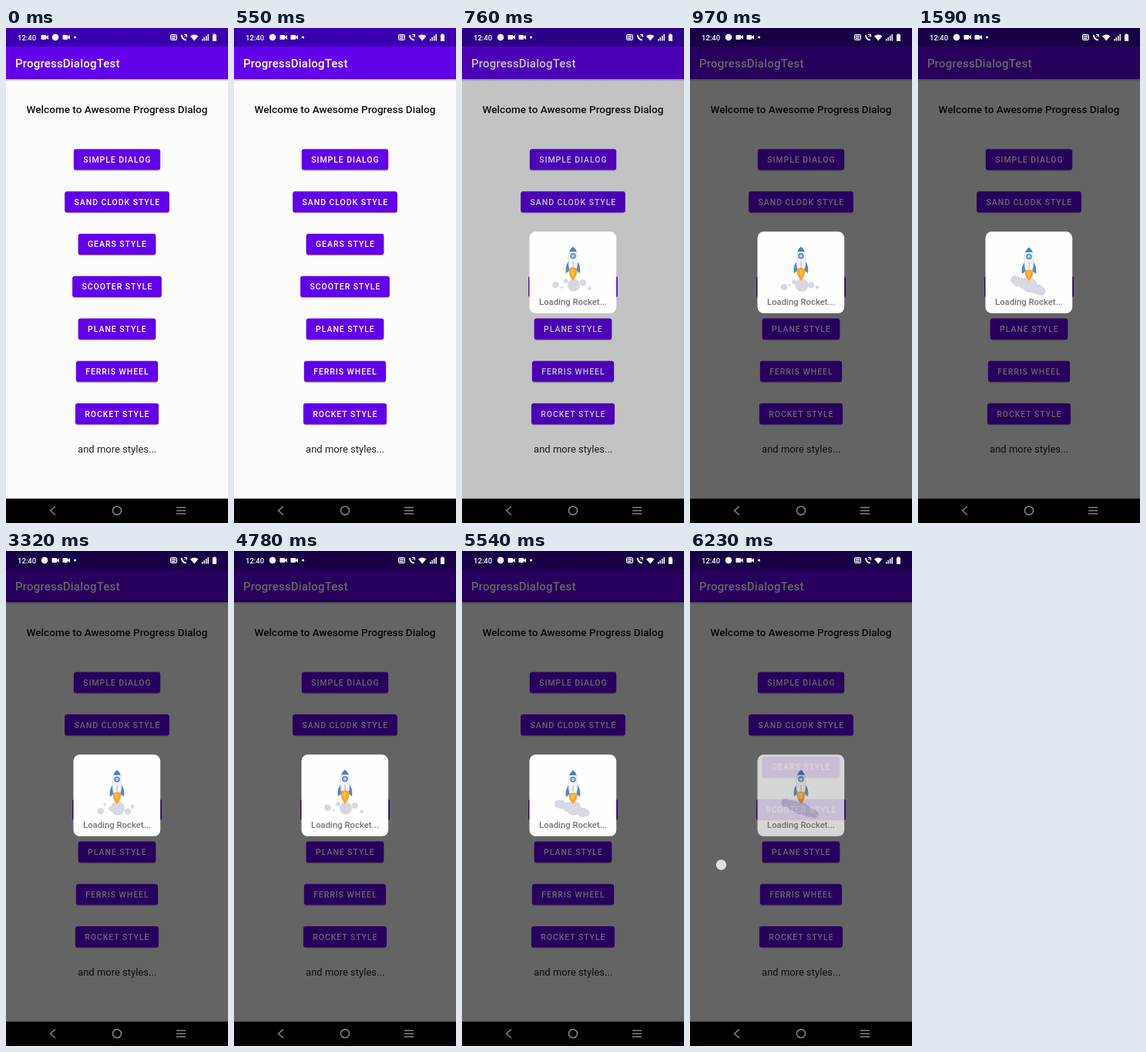
An HTML page for the animation above (6300 ms loop, 288 px wide and 640 px high).

```html
<!DOCTYPE html>
<html lang="en">
<head>
<meta charset="utf-8">
<title>Progress dialog</title>
<style>
  html, body { margin: 0; width: 100%; height: 100%; overflow: hidden; background: #000; }
  svg { display: block; width: 288px; height: 640px; font-family: Roboto, sans-serif; }
  text { dominant-baseline: central; }
  .mid { text-anchor: middle; }
  .medium { font-weight: 500; }
  .button { font-size: 10.5px; font-weight: 500; letter-spacing: .0893em; fill: #fff; }
</style>
</head>
<body>
<svg viewBox="0 0 288 640">
  <defs>
    <linearGradient id="shade" x2="0" y2="1">
      <stop stop-color="#000" stop-opacity=".3"/>
      <stop offset="1" stop-color="#000" stop-opacity="0"/>
    </linearGradient>
    <g id="cam">
      <rect x="-4.5" y="-3" width="6.5" height="6" rx="1"/>
      <path d="M2 -.8 5 -3V3L2 .8Z"/>
    </g>
  </defs>

  <rect width="288" height="640" fill="#fcfcfd"/>
  <rect y="66" width="288" height="3" fill="url(#shade)"/>
  <rect width="288" height="66" fill="#6200ea"/>
  <rect width="288" height="24" fill="#3a00b0"/>
  <text class="medium" x="12" y="45.5" font-size="15" letter-spacing=".19" fill="#fff">ProgressDialogTest</text>
  <text class="mid medium" x="144" y="105" font-size="13.55" fill="#111">Welcome to Awesome Progress Dialog</text>
  <g id="buttons"></g>
  <text class="mid" x="144.2" y="544.5" font-size="13" fill="#222">and more styles...</text>

  <rect id="dim" width="288" height="609"/>

  <g fill="#fff">
    <text class="medium" x="15" y="12.5" font-size="9.5">12:40</text>
    <circle id="badge" cy="12" r="4.3"/>
    <use id="cam1" href="#cam" y="12"/>
    <use href="#cam" x="78" y="12"/>
    <circle cx="89.5" cy="12" r="1.6"/>
    <g fill="none" stroke="#fff">
      <rect x="213.5" y="8.5" width="8" height="7" rx="1" fill="#fff" fill-opacity=".35"/>
      <path d="M215 11h5M215 13.5h4"/>
      <path d="M227.8 8.8c.3 3.5 2.7 6.2 6 6.7" stroke-width="2"/>
      <path d="M231 8.5h3.5V12M234.5 8.5l-3 3"/>
    </g>
    <path d="M239 10.5q5.200-4 10.400 0L244.200 16.500z"/>
    <path d="M254 14h1.500v2.500H254zM256.500 12H258v4.500h-1.500zM259 10h1.500v6.500H259zM261.500 8H263v8.500h-1.500z"/>
    <path d="M268 8.500h1.300v-1h2.400v1H273V17h-5z"/>
  </g>

  <rect y="608.5" width="288" height="32"/>
  <g fill="none" stroke="#858590" stroke-width="1.5">
    <path d="M64 618.5 57.5 624l6.500 5.500"/>
    <circle cx="144" cy="624" r="5.5"/>
    <path d="M221 620h12M221 624h12M221 628h12"/>
  </g>

  <g id="dialog">
    <rect x="87.500" y="263.300" width="112.700" height="105.500" rx="8" fill="#fefeff"/>
    <g id="smoke" fill="#d9d7e3"></g>
    <g id="rocket">
      <path d="M139 302c-4 4-5 9-4 16l5-4zM149 302c4 4 5 9 4 16l-5-4z" fill="#4f8ac4"/>
      <path d="M139.500 289.500c-2 8-2 17 .5 25h8c2.500-8 2.500-17 .5-25z" fill="#f3f3f7" stroke="#d6d6e0" stroke-width=".7"/>
      <path d="M144 283.500c-2.500 2-4 4-4.700 6.500h9.400c-.7-2.500-2.200-4.500-4.700-6.500z" fill="#4682bd"/>
      <circle cx="144" cy="295.500" r="3" fill="#c4cbd6" stroke="#4f8ac4" stroke-width="1.600"/>
      <path d="M143.300 303h1.400v8h-1.400z" fill="#bcc5d2"/>
    </g>
    <g id="flame">
      <path d="M139 313q5-3 10 0c1.500 5-1.500 10-5 14-3.500-4-6.500-9-5-14z" fill="#fba428"/>
      <path d="M142 314h4q1 4-2 8-3-4-2-8z" fill="#ffc044"/>
    </g>
    <text class="mid medium" x="144" y="354" font-size="11.300" fill="#75757c">Loading Rocket...</text>
  </g>
  <circle id="touch" cx="40.500" cy="405.800" r="6.700" fill="#fff" opacity=".8"/>
</svg>
<script>
  const LOOP = 6300, STEPS = 91, SMOKE_LOOP = 2010, TAU = 2 * Math.PI;
  const $ = id => document.getElementById(id);
  const ramp = (t, a, b) => Math.min(1, Math.max(0, (t - a) / (b - a)));
  const ease = k => k * k * (3 - 2 * k);
  const mix = (a, b, k) => a + (b - a) * k;

  function set(el, attrs) {
    for (const k in attrs) el.setAttribute(k, attrs[k]);
    return el;
  }
  function add(parent, tag, attrs = {}) {
    const el = document.createElementNS('http://www.w3.org/2000/svg', tag);
    return parent.appendChild(set(el, attrs));
  }

  // Buttons hug their labels with a fixed padding
  const labels = ['SIMPLE DIALOG', 'SAND CLODK STYLE', 'GEARS STYLE', 'SCOOTER STYLE',
    'PLANE STYLE', 'FERRIS WHEEL', 'ROCKET STYLE'];
  labels.forEach((label, i) => {
    const y = 170 + i * 54.8, group = $('buttons');
    const shadow = add(group, 'rect', { opacity: .25 });
    const face = add(group, 'rect', { fill: '#6200ea' });
    const text = add(group, 'text', { class: 'mid button', x: 144.4, y: y + .3 });
    text.textContent = label;
    const width = text.getComputedTextLength() + 24;
    const box = { x: 144 - width / 2, width, height: 27.2, rx: 3 };
    set(shadow, { ...box, y: y - 12.5 });
    set(face, { ...box, y: y - 13.6 });
  });

  const core = add($('smoke'), 'circle', { cx: 145 });
  const puffs = Array.from({ length: 7 }, () => add($('smoke'), 'circle'));

  // Scattered wisps swell into one slanted cloud, then shrink again
  function drawSmoke(phase) {
    const swell = ease(ramp(phase, .25, .42)) - ease(ramp(phase, .7, .92));
    set(core, { cy: 332.5, r: 8 + swell + Math.sin(phase * TAU) });
    puffs.forEach((puff, i) => {
      const u = i / (puffs.length - 1) - .5;
      const sway = Math.sin(phase * TAU + i * 2.4);
      set(puff, {
        cx: 143 + u * mix(43, 36, swell) + sway,
        cy: mix(332 + sway * 5, 333 + u * 15, swell),
        r: mix(2.7 + 1.6 * Math.cos(i * 2.4), 7.5 - 8 * u * u, swell)
      });
    });
  }

  function draw(t) {
    const enter = ramp(t, 620, 740), leave = ramp(t, 6190, 6350);
    set($('dim'), { opacity: .6 * ramp(t, 640, 960) });
    set($('dialog'), {
      opacity: enter * (1 - leave),
      transform: `translate(144 316) scale(${mix(.9, 1, enter)}) translate(-144 -316)`
    });

    const phase = ((t - 760 + SMOKE_LOOP) % SMOKE_LOOP) / SMOKE_LOOP;
    const wave = Math.cos((phase - .95) * TAU);
    drawSmoke(phase);
    set($('rocket'), { transform: `translate(0 ${-.4 - .4 * wave})` });
    set($('flame'), { transform: `translate(144 326) scale(1 ${1.04 + .12 * wave}) translate(-144 -326)` });

    const swapped = t > 380;
    set($('badge'), { cx: swapped ? 50 : 64 });
    set($('cam1'), { x: swapped ? 64 : 50 });
    set($('touch'), { visibility: t > 6120 ? 'visible' : 'hidden' });
  }

  const start = performance.now();
  function tick() {
    const t = (performance.now() - start) % LOOP, step = LOOP / STEPS;
    draw(Math.min(STEPS - 1, Math.floor((t + 4) / step)) * step);
    requestAnimationFrame(tick);
  }
  tick();
</script>
</body>
</html>
```
